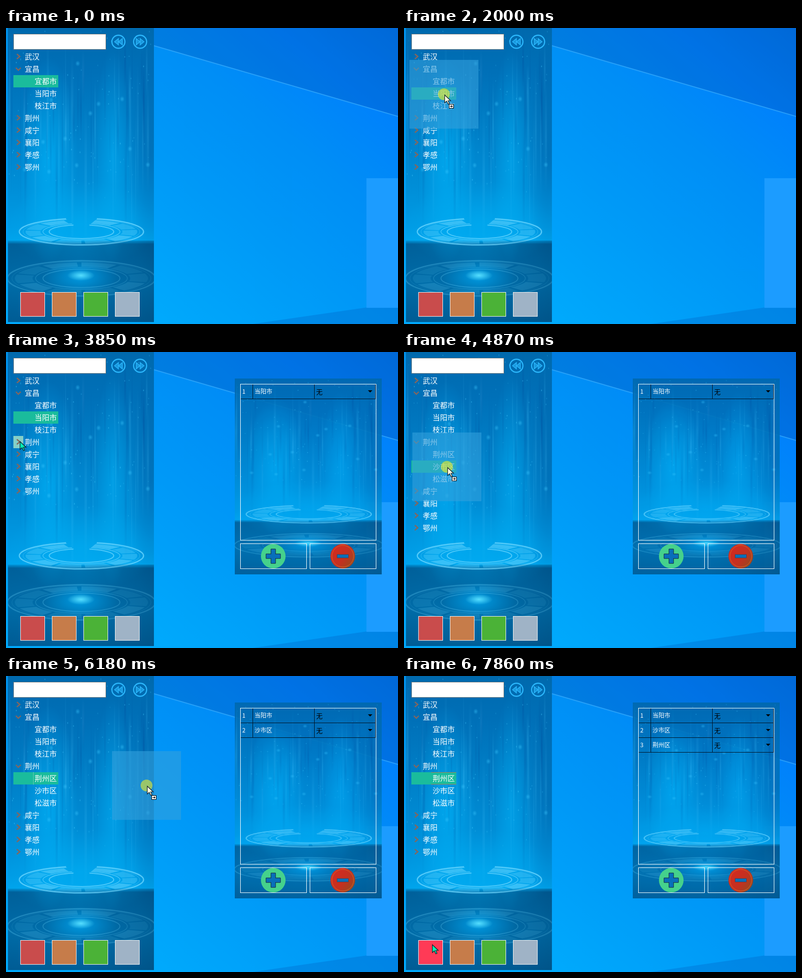
These frames come from a looping animation (795 px wide and 603 px high, 8 s). An HTML page with a canvas:

```html
<!DOCTYPE html>
<html lang="zh-CN">
<head>
<meta charset="utf-8">
<title>区域列表拖放</title>
<style>
  html, body { margin: 0; width: 100%; height: 100%; overflow: hidden; background: #0094f5; }
  canvas { display: block; }
</style>
</head>
<body>
<canvas id="stage" width="795" height="603"></canvas>
<script>
const W = 795, H = 603, LOOP = 8000;
const FONT = '"Noto Sans CJK SC", "Noto Sans CJK", "Noto Sans", sans-serif';
const ctx = document.getElementById('stage').getContext('2d');

function layer(w, h, paint) {
  const c = document.createElement('canvas');
  c.width = w; c.height = h;
  paint(c.getContext('2d'));
  return c;
}

function gradient(g, x0, y0, x1, y1, stops) {
  const fill = g.createLinearGradient(x0, y0, x1, y1);
  stops.forEach(([at, color]) => fill.addColorStop(at, color));
  return fill;
}

function glow(g, x, y, rx, ry, color) {
  g.save();
  g.translate(x, y);
  g.scale(rx, ry);
  const fill = g.createRadialGradient(0, 0, 0, 0, 0, 1);
  fill.addColorStop(0, `rgba(${color})`);
  fill.addColorStop(1, `rgba(${color.replace(/,[^,]*$/, ',0')})`);
  g.fillStyle = fill;
  g.fillRect(-1, -1, 2, 2);
  g.restore();
}

function poly(g, points, fill, stroke, width = 1) {
  g.beginPath();
  points.forEach(([x, y]) => g.lineTo(x, y));
  g.closePath();
  if (fill) { g.fillStyle = fill; g.fill(); }
  if (stroke) { g.strokeStyle = stroke; g.lineWidth = width; g.stroke(); }
}

function line(g, points, color, width = 1) {
  g.beginPath();
  points.forEach(([x, y]) => g.lineTo(x, y));
  g.strokeStyle = color; g.lineWidth = width;
  g.stroke();
}

function disc(g, x, y, r, fill, stroke, width = 1) {
  g.beginPath();
  g.arc(x, y, r, 0, 7);
  if (fill) { g.fillStyle = fill; g.fill(); }
  if (stroke) { g.strokeStyle = stroke; g.lineWidth = width; g.stroke(); }
}

function box(g, x, y, w, h, fill, stroke) {
  if (fill) { g.fillStyle = fill; g.fillRect(x, y, w, h); }
  if (stroke) { g.strokeStyle = stroke; g.lineWidth = 1; g.strokeRect(x + .5, y + .5, w - 1, h - 1); }
}

function label(g, text, x, y, size, color) {
  g.font = `${size}px ${FONT}`;
  g.fillStyle = color;
  g.fillText(text, x, y);
}

// ---- Static scenery ----
const wallpaper = layer(W, H, g => {
  box(g, 0, 0, W, H, gradient(g, 300, 603, 795, 0, [
    [0, '#00aafc'], [.35, '#0099f7'], [.6, '#008ef6'], [.8, '#0082fb'], [1, '#0076ea']]));
  poly(g, [[300, 0], [795, 0], [795, 180], [300, 36]], 'rgba(0,50,140,.2)');
  line(g, [[300, 36], [795, 180]], 'rgba(60,175,255,.65)', 2);
  poly(g, [[500, 603], [795, 560], [795, 603]], 'rgba(0,70,170,.22)');
  box(g, 731, 306, 264, 264, '#1c9cff');
  box(g, 0, 0, 300, H, gradient(g, 0, 0, 0, H, [[0, '#008fe8'], [1, '#00a9fc']]));
});

function ring(g, cx, cy, rx, ry, gap, alpha) {
  const start = -Math.PI / 2 + gap, end = Math.PI * 1.5 - gap;
  const color = a => `rgba(110,215,255,${a * alpha})`;
  const arc = (k, a, width) => {
    g.beginPath();
    g.ellipse(cx, cy, rx * k, ry * k, 0, start, end);
    g.strokeStyle = color(a); g.lineWidth = width;
    g.stroke();
  };
  arc(1, .75, 2.5);
  arc(.94, .4, 1);
  arc(.62, .6, 1.5);
  arc(.52, .7, 2);
  for (let i = 0; i < 10; i++) {
    const a = start + (end - start) * i / 10, b = a + (end - start) / 10 - .07;
    g.beginPath();
    g.ellipse(cx, cy, rx * .9, ry * .9, 0, a, b);
    g.ellipse(cx, cy, rx * .66, ry * .66, 0, b, a, true);
    g.closePath();
    g.fillStyle = color(i % 3 ? .3 : .5);
    g.fill();
  }
}

const scene = layer(296, 599, g => {
  let seed = 11;
  const random = () => (seed = seed * 16807 % 2147483647) / 2147483647;
  box(g, 0, 0, 296, 599, gradient(g, 0, 0, 0, 599, [
    [0, '#0069ad'], [.15, '#0070b8'], [.35, '#0080c8'], [.55, '#008fd8'], [.68, '#009ce5'],
    [.722, '#00a4ec'], [.735, '#00649f'], [.8, '#006aa6'], [.87, '#0071ae'], [1, '#005f98']]));
  glow(g, 82, 270, 60, 210, '0,185,255,.6');
  glow(g, 212, 260, 38, 220, '0,185,255,.45');
  glow(g, 148, 400, 150, 90, '0,190,255,.35');
  glow(g, 290, 260, 45, 240, '0,60,130,.28');
  for (let i = 0; i < 70; i++) {
    const x = random() * 296, y = random() * 200, h = 90 + random() * 200;
    const tone = random() < .55 ? '80,200,255' : '0,70,150';
    box(g, x, y, 1 + random() * 4, Math.min(h, 425 - y), gradient(g, 0, y, 0, y + h, [
      [0, `rgba(${tone},0)`], [.5, `rgba(${tone},.14)`], [1, `rgba(${tone},0)`]]));
  }
  for (let i = 0; i < 110; i++) {
    box(g, random() * 296, random() * 350, 1.5, 1.5 + random() * 2, `rgba(70,205,255,${.15 + random() * .35})`);
  }
  for (let i = 0; i < 12; i++) glow(g, random() * 296, 60 + random() * 250, 5, 6, '60,200,255,.45');
  ring(g, 149, 415, 126, 27, .25, 1);
  glow(g, 148, 506, 75, 36, '0,170,245,.75');
  ring(g, 149, 510, 150, 36, 0, .38);
  glow(g, 148, 504, 28, 11, '90,225,255,.95');
  box(g, 0, 433, 296, 166, gradient(g, 0, 0, 296, 0, [
    [0, 'rgba(0,60,110,.1)'], [.5, 'rgba(0,60,110,0)'], [1, 'rgba(0,50,90,.25)']]));
});

const fastArrows = (g, x, dir) => {
  disc(g, x, 28, 13.2, null, '#2bb6fb', 2.4);
  for (const shift of [-8, 0]) {
    const tip = x + dir * (shift + 8), base = x + dir * shift;
    poly(g, [[tip, 28], [base, 21.5], [base, 34.5]], 'rgba(43,182,251,.6)', '#2bb6fb', 1.4);
  }
};

const sidebar = layer(W, H, g => {
  g.drawImage(wallpaper, 0, 0);
  g.drawImage(scene, 4, 0);
  box(g, 15, 12, 188, 32, '#fff', '#7a7a7a');
  fastArrows(g, 228, -1);
  fastArrows(g, 272, 1);
  ['#c94c4c', '#c67c4a', '#4bb237', '#9fb3c6'].forEach((c, i) => box(g, 29 + i * 64, 538, 50, 50, c, '#f2f2f2'));
});

const panel = layer(W, H, g => {
  g.globalAlpha = .9;
  g.drawImage(scene, 464, 54, 298, 399);
  g.globalAlpha = 1;
  box(g, 475, 65, 276, 319, null, '#fff');
  box(g, 475, 390, 135, 52, null, '#fff');
  box(g, 616, 390, 135, 52, null, '#fff');
  disc(g, 542, 416, 25, '#45d18c');
  const plus = new Path2D();
  const arms = [[538, 402], [546, 402], [546, 412], [556, 412], [556, 420], [546, 420],
    [546, 430], [538, 430], [538, 420], [528, 420], [528, 412], [538, 412]];
  arms.forEach(([x, y]) => plus.lineTo(x, y));
  plus.closePath();
  g.lineJoin = 'round';
  g.strokeStyle = '#153b55'; g.lineWidth = 2.5; g.stroke(plus);
  g.fillStyle = '#086fba'; g.fill(plus);
  disc(g, 683, 416, 25, gradient(g, 660, 400, 706, 432, [[0, '#d62a20'], [.55, '#c43020'], [1, '#97491f']]));
  disc(g, 683, 416, 22, null, '#d0682a');
  box(g, 671, 412, 24, 8, '#086fba', '#5b3b48');
});

// ---- Timeline ----
// Bursts of evenly spaced updates: [start, end, steps].
const bursts = [[280, 1060, 11], [1130, 1370, 4], [2000, 2790, 11], [2840, 3620, 11], [3700, 3850, 3],
  [4020, 4790, 11], [4870, 5640, 11], [5720, 5870, 3], [6020, 6790, 11], [6870, 7630, 11], [7710, 7860, 3]];

const path = [[280, 655, 548], [670, 330, 330], [980, 64, 160], [1060, 60, 134], [1130, 62, 126], [1370, 82, 136],
  [2000, 82, 136], [2160, 252, 156], [2316, 444, 174], [2474, 507, 222], [2790, 507, 222],
  [2840, 490, 217], [3540, 92, 163], [3620, 48, 188], [3850, 28, 182],
  [4100, 28, 182], [4480, 50, 210], [4790, 86, 234],
  [4870, 88, 235], [5256, 560, 237], [5332, 560, 237], [5640, 176, 228],
  [5870, 82, 208], [6020, 84, 209], [6405, 590, 247], [6560, 590, 247], [6790, 478, 259],
  [6870, 440, 286], [7630, 57, 541], [7860, 57, 547]];

const drags = [[2000, 2470], [4870, 5330], [6020, 6480]];

function snap(t) {
  let last = 0;
  for (const [start, end, steps] of bursts) {
    for (let k = 0; k < steps; k++) {
      const at = start + k * (end - start) / (steps - 1);
      if (Math.round(at / 10) * 10 > t) return last;
      last = at;
    }
  }
  return last;
}

function cursorAt(t) {
  const i = path.findIndex(p => p[0] > t);
  if (i < 0) return path[path.length - 1].slice(1);
  const [t0, x0, y0] = path[i - 1], [t1, x1, y1] = path[i];
  const k = (t - t0) / (t1 - t0);
  return [Math.round(x0 + (x1 - x0) * k), Math.round(y0 + (y1 - y0) * k)];
}

// ---- Live parts ----
const tree = [['武汉'], ['宜昌', '宜都市', '当阳市', '枝江市'], ['荆州', '荆州区', '沙市区', '松滋市'],
  ['咸宁'], ['襄阳'], ['孝感'], ['鄂州']];

function visibleRows(t) {
  return tree.flatMap(([name, ...children], i) => {
    const open = i === 1 || (i === 2 && t >= 4090);
    return [{ name, open }, ...(open ? children.map(name => ({ name, child: true })) : [])];
  });
}

function drawTree(t, cursor, dragging) {
  const selected = t < 2000 ? '宜都市' : t < 4870 ? '当阳市' : t < 6020 ? '沙市区' : '荆州区';
  visibleRows(t).forEach(({ name, open, child }, i) => {
    const top = 46 + i * 25, mid = top + 12, left = child ? 55 : 35;
    if (name === selected) {
      box(ctx, 15, top, 91, 25, '#1abc9c');
      if (t >= 6400) {
        line(ctx, [[55, top + .5], [106, top + .5]], '#a88450');
        line(ctx, [[55, top + 24.5], [106, top + 24.5]], '#a88450');
      } else if (t >= 5400) {
        ctx.setLineDash([1, 1]);
        line(ctx, [[55.5, top], [55.5, top + 25]], '#b7d8c4');
        ctx.setLineDash([]);
      }
    } else if (cursor && !dragging && cursor[1] >= top && cursor[1] < top + 25) {
      const x = cursor[0];
      if (x >= left && x < 106) box(ctx, left, top, 106 - left, 25, 'rgba(165,228,200,.8)');
      else if (!child && x >= 15 && x < 35) box(ctx, 15, top, 20, 25, 'rgba(165,228,200,.8)');
    }
    if (!child) {
      line(ctx, open ? [[20, mid - 2], [25, mid + 3], [30, mid - 2]]
        : [[22, mid - 5], [28, mid], [22, mid + 5]], '#87665a', 2.4);
    }
    label(ctx, name, child ? 58 : 38, mid + 6, 15, '#fff');
  });
}

function drawTable(t) {
  const names = ['当阳市', '沙市区', '荆州区'].slice(0, t < 5320 ? 1 : t < 6470 ? 2 : 3);
  names.forEach((name, i) => {
    const top = 66 + i * 30, bottom = top + 29.5;
    line(ctx, [[476, bottom], [749.5, bottom], [749.5, top]], '#001426');
    for (const x of [500.5, 625.5]) line(ctx, [[x, top], [x, bottom]], '#001426');
    label(ctx, String(i + 1), 479, top + 19, 12, '#fff');
    label(ctx, name, 504, top + 19, 12, '#fff');
    label(ctx, '无', 629, top + 20, 13, '#000');
    poly(ctx, [[734, top + 12], [743, top + 12], [738.5, top + 16.5]], '#000');
  });
}

function drawArrow(x, y, fill) {
  const shape = [[0, 0], [0, 16], [4, 12.5], [7, 18.5], [9.5, 17.5], [6.8, 11.5], [12, 11.5]];
  poly(ctx, shape.map(([dx, dy]) => [x + dx + .5, y + dy + .5]), fill, '#10202c', 1.2);
}

function drawDrag(x, y) {
  box(ctx, x - 71, y - 71, 140, 140, 'rgba(52,160,220,.58)');
  disc(ctx, x - 1, y - 1, 12, 'rgba(235,235,40,.6)');
  const overList = x < 300 || (x > 475 && x < 750);
  if (overList) {
    drawArrow(x, y, '#fffbe0');
    box(ctx, x + 9, y + 19, 10, 9, '#fff', '#000');
    line(ctx, [[x + 11, y + 23.5], [x + 16, y + 23.5]], '#000');
    poly(ctx, [[x + 14, y + 21], [x + 17, y + 23.5], [x + 14, y + 26]], '#000');
  } else {
    disc(ctx, x + 8, y + 8, 7, null, '#000', 2.6);
    line(ctx, [[x + 3, y + 3], [x + 13, y + 13]], '#000', 2.6);
  }
}

function draw(time) {
  const t = snap(time % LOOP);
  const cursor = t >= 280 ? cursorAt(t) : null;
  const dragging = drags.some(([from, to]) => t >= from && t < to);
  ctx.drawImage(sidebar, 0, 0);
  drawTree(t, cursor, dragging);
  if (t >= 2230) {
    ctx.drawImage(panel, 0, 0);
    drawTable(t);
  }
  if (!cursor) return;
  const [x, y] = cursor;
  if (x >= 29 && x < 79 && y >= 538 && y < 588) box(ctx, 29, 538, 50, 50, '#ff3a56', '#f2f2f2');
  if (dragging) return drawDrag(x, y);
  if (t >= 4020 && t < 4170) disc(ctx, x - 1, y - 1, 12, 'rgba(235,235,40,.6)');
  drawArrow(x, y, '#06efb4');
}

const began = performance.now();
(function tick() {
  draw(performance.now() - began);
  requestAnimationFrame(tick);
})();
</script>
</body>
</html>
```
